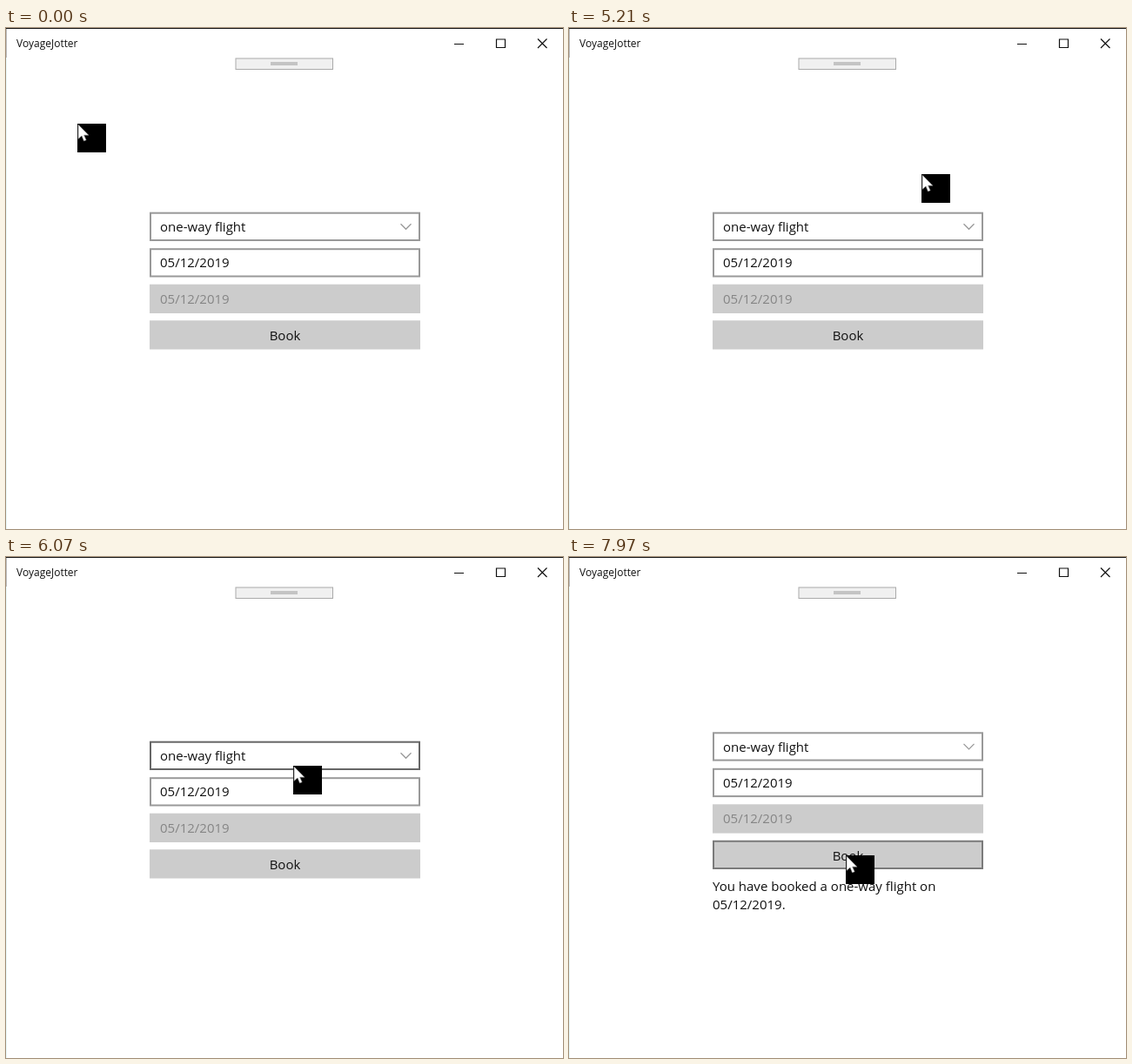
Animation of 640x576 px, one loop 8 s. Source, as an HTML page:

```html
<!DOCTYPE html>
<html lang="en">
<head>
<meta charset="utf-8">
<title>VoyageJotter</title>
<style>
  html, body { margin: 0; width: 100%; height: 100%; overflow: hidden; background: #fff; }
  svg { display: block; width: 640px; height: 576px; }
  text { font: 15px "Open Sans", "Noto Sans", sans-serif; fill: #111; white-space: pre; }
  .title { font-size: 12px; }
  .disabled { fill: #858585; }
  .line { fill: none; stroke: #111; stroke-width: 1.2; }
  .field { fill: #fff; stroke: #999; stroke-width: 2; }
  .field.hover { stroke: #666; }
  #button { fill: #ccc; stroke: none; stroke-width: 2; }
  #button.hover { stroke: #7a7a7a; }
  #button.pressed { fill: #999; stroke: none; }
</style>
</head>
<body>
<svg viewBox="0 0 640 576">
  <rect width="640" height="1" fill="#151515"/>
  <rect y="1" width="1" height="33" fill="#b8b8b8"/>
  <rect y="34" width="1" height="542" fill="#e6f5f5"/>
  <text class="title" x="12" y="22">VoyageJotter</text>
  <path class="line" d="M515 18.5h11M563.5 13h10v9.5h-10zM611 12.5l10.500 10.500m0-10.500l-10.500 10.500"/>
  <rect x="264" y="35" width="111.500" height="12.500" fill="#f0f0f0" stroke="#aaa"/>
  <rect x="304" y="39" width="31" height="4" fill="#c4c4c4"/>

  <g id="form">
    <rect class="field" id="combo" x="166" y="212.700" width="309" height="31.300"/>
    <path d="M453.500 225.300l6 6 6-6" fill="none" stroke="#999" stroke-width="1.300"/>
    <text x="177" y="234">one-way flight</text>
    <rect class="field" id="date" x="166" y="254.200" width="309" height="31.300"/>
    <text x="177" y="275">05/12/2019</text>
    <rect x="165" y="294.700" width="311" height="33.300" fill="#ccc"/>
    <text class="disabled" x="177" y="316.500">05/12/2019</text>
    <polygon id="button"/>
    <text id="label" x="320.500" y="359" text-anchor="middle">Book</text>
    <g id="message">
      <text x="165" y="394.500">You have booked a one-way flight on</text>
      <text x="165" y="415">05/12/2019.</text>
    </g>
  </g>

  <g id="cursor">
    <rect width="33" height="33"/>
    <path d="M1 1V17.500L5 14 7.500 20 10.200 18.800 7.700 13.200H13Z" fill="#fff" stroke="#777" stroke-width=".6"/>
  </g>
</svg>
<script>
const LOOP = 8000, TICK = 100 / 3;
const PRESS = 203, RELEASE = 205, RECOVER = 206, SETTLED = 213;
const SHIFT = -10.4;

// Pointer path: tick, x, y
const path = [
  [0, 82, 110], [155.999, 82, 110], [156, 405, 168], [164, 405, 168],
  [167, 475, 213], [170, 546, 226], [173, 525, 230], [178, 400, 233],
  [182, 330, 240], [186, 320, 278], [189, 318, 309], [191, 318, 324],
  [195, 318, 343], [240, 318, 343]
];

const $ = id => document.getElementById(id);
const clamp = v => Math.max(0, Math.min(1, v));
const mix = (a, b, k) => a + (b - a) * k;

function pointerAt(tick) {
  const i = path.findIndex(p => p[0] > tick);
  const [t0, x0, y0] = path[i - 1], [t1, x1, y1] = path[i];
  const k = (tick - t0) / (t1 - t0);
  return [mix(x0, x1, k), mix(y0, y1, k)];
}

// How far the button is tilted away, 0 to 1
function tiltAt(tick) {
  if (tick < RECOVER) return clamp((tick - PRESS + 1) / 3);
  return (1 - clamp((tick - RECOVER) / (SETTLED - RECOVER))) ** 2;
}

function drawButton(tilt, hovered) {
  const edge = hovered ? 1 : 0;
  const top = 336.2 + edge + tilt * .6, bottom = 369.5 - edge - tilt * .6;
  const topInset = edge + tilt * 3.4, bottomInset = edge + tilt * 2.2;
  $('button').setAttribute('points', [
    165 + topInset, top, 476 - topInset, top,
    476 - bottomInset, bottom, 165 + bottomInset, bottom
  ].join(' '));
}

function draw(time) {
  const tick = Math.floor(time % LOOP / TICK);
  const [x, y] = pointerAt(tick);
  const booked = tick >= RELEASE, shift = booked ? SHIFT : 0;
  const over = top => x >= 165 && x <= 476 && y >= top + shift && y <= top + 33.3 + shift;
  const hovered = over(336.2), tilt = tiltAt(tick);

  $('cursor').setAttribute('transform', `translate(${x} ${y})`);
  $('form').setAttribute('transform', `translate(0 ${shift})`);
  $('message').setAttribute('visibility', booked ? 'visible' : 'hidden');
  $('combo').classList.toggle('hover', over(211.7));
  $('date').classList.toggle('hover', over(253.2));
  $('button').classList.toggle('hover', hovered);
  $('button').classList.toggle('pressed', tick >= PRESS && !booked);
  $('label').setAttribute('opacity', 1 - tilt * .2);
  drawButton(tilt, hovered);
}

const start = performance.now();
function loop() {
  draw(performance.now() - start);
  requestAnimationFrame(loop);
}
loop();
</script>
</body>
</html>
```
